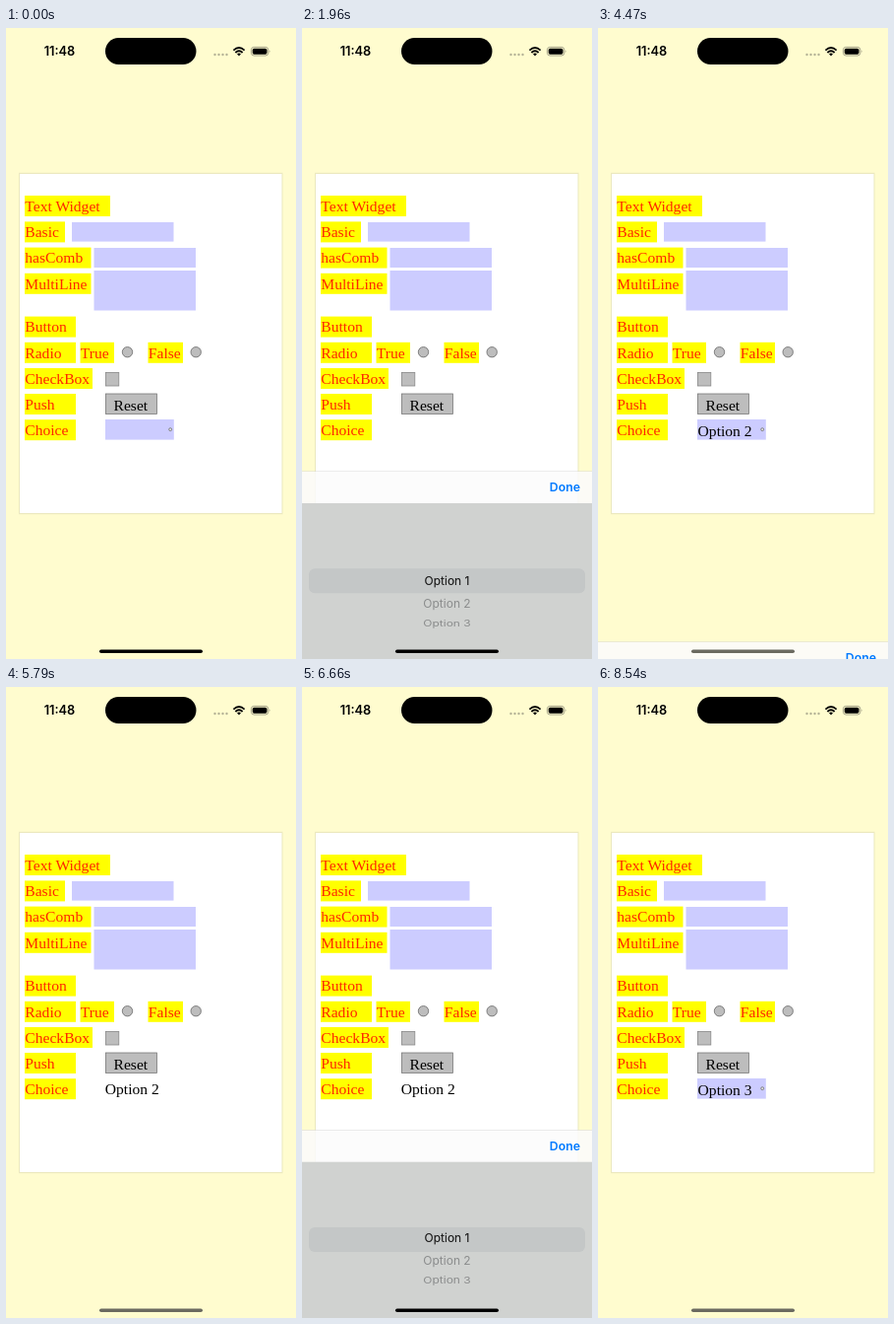
These frames come from a looping animation (295 px wide and 640 px high, 9230 ms). An HTML page:

```html
<!DOCTYPE html>
<html lang="en">
<head>
<meta charset="utf-8">
<title>Form picker</title>
<style>
  html, body { margin: 0; width: 100%; height: 100%; overflow: hidden; background: #fffccf; }
  svg { display: block; width: 295px; height: 640px; }
  .form text { font: 15.6px "Liberation Serif", "Times New Roman", serif; }
  .ui { font-family: Inter, "Liberation Sans", sans-serif; }
  .opt { font-size: 12px; text-anchor: middle; }
</style>
</head>
<body>
<svg viewBox="0 0 295 640">
  <defs>
    <clipPath id="bandClip"><rect x="7" y="548" width="281" height="25" rx="6"/></clipPath>
    <clipPath id="wheelClip"><rect x="0" y="482" width="295" height="158"/></clipPath>
  </defs>
  <rect width="295" height="640" fill="#fffccf"/>

  <g class="form">
    <rect x="13" y="146.8" width="268.5" height="346.4" fill="#000" opacity=".08"/>
    <rect x="14" y="148" width="266.5" height="344" fill="#fff"/>
    <g id="labels"></g>
    <g fill="#ccccff">
      <rect x="67" y="197" width="103.5" height="19.6"/>
      <rect x="89.5" y="223" width="103.5" height="20"/>
      <rect x="89.5" y="246" width="103.5" height="40.5"/>
    </g>
    <g fill="#bdbdbd" stroke="#666" stroke-width=".8">
      <circle cx="123.5" cy="328.7" r="5.2"/>
      <circle cx="193.2" cy="328.7" r="5.2"/>
      <rect x="101.4" y="349.4" width="13.4" height="13.6" stroke="#888"/>
      <rect x="101.4" y="371" width="52" height="20.4" stroke="#777"/>
    </g>
    <text x="109.5" y="388">Reset</text>
    <g id="field">
      <rect x="101" y="397" width="69.8" height="20.6" fill="#ccccff"/>
      <circle cx="167.2" cy="407.2" r="1.5" fill="#ddd" stroke="#666" stroke-width=".7"/>
    </g>
    <text id="choice"></text>
  </g>

  <g class="ui">
    <text x="54.5" y="28.4" font-size="12.8" font-weight="600" text-anchor="middle">11:48</text>
    <rect x="101" y="10" width="92.5" height="27" rx="13.5"/>
    <g fill="#b5b396">
      <circle cx="212.5" cy="27" r="1.2"/><circle cx="216.5" cy="27" r="1.2"/>
      <circle cx="220.5" cy="27" r="1.2"/><circle cx="224.5" cy="27" r="1.2"/>
    </g>
    <g fill="none" stroke="#000" stroke-width="1.8">
      <path d="M231.4 22.6Q237 17.4 242.6 22.6"/>
      <path d="M233.4 25Q237 21.6 240.6 25"/>
    </g>
    <path d="M237 28.4L235 26.3Q237 24.8 239 26.3Z"/>
    <rect x="249.4" y="19.4" width="17.4" height="8.6" rx="2.8" fill="none" stroke="#9b9982" stroke-width=".9"/>
    <rect x="250.7" y="20.7" width="14.8" height="6" rx="1.7"/>
    <path d="M267.8 22.2Q269.4 23.7 267.8 25.2Z" fill="#9b9982"/>

    <g id="panel">
      <rect y="449.3" width="295" height="32.7" fill="#fcfcfc" fill-opacity=".87"/>
      <rect y="449" width="295" height=".6" fill="#000" opacity=".12"/>
      <text x="283" y="470.2" font-size="12.3" font-weight="600" text-anchor="end" fill="#007aff">Done</text>
      <rect y="481.7" width="295" height="159" fill="#d0d2d0"/>
      <rect x="7" y="548" width="281" height="25" rx="6" fill="#c4c7c7"/>
      <g id="dim" clip-path="url(#wheelClip)" fill="#8a8c8c"></g>
      <g id="lit" clip-path="url(#bandClip)" fill="#1c1c1c"></g>
    </g>
    <rect id="home" x="95" y="630.4" width="105" height="3.6" rx="1.8"/>
  </g>
</svg>

<script>
const LOOP = 9230;
const $ = id => document.getElementById(id);

function add(parent, tag, attrs, text = "") {
  const el = document.createElementNS("http://www.w3.org/2000/svg", tag);
  for (const k in attrs) el.setAttribute(k, attrs[k]);
  el.textContent = text;
  return parent.appendChild(el);
}

// text, left, width, top
[
  ["Text Widget", 19, 87, 170], ["Basic", 19, 41, 196.4], ["hasComb", 19, 67.5, 222.6],
  ["MultiLine", 19, 67.5, 248.8], ["Button", 19, 52, 292.6], ["Radio", 19, 52, 318.8],
  ["True", 75.5, 34.5, 318.8], ["False", 144.5, 35.5, 318.8], ["CheckBox", 19, 69, 345],
  ["Push", 19, 52, 371], ["Choice", 19, 52, 397.2]
].forEach(([text, x, width, y]) => {
  add($("labels"), "rect", { x, y, width, height: 21, fill: "#ffff00" });
  add($("labels"), "text", { x: x + .3, y: y + 15.7, fill: "#ff2600" }, text);
});

const rows = [1, 2, 3].map(n =>
  ["dim", "lit"].map(id => add($(id), "text", { class: "opt" }, "Option " + n)));

// Bursts of movement: start, end, number of picture changes
const bursts = [
  [1290, 1960, 7], [2320, 2670, 4], [2920, 3040, 2], [3210, 3680, 5],
  [4120, 4790, 7], [5790, 6370, 6], [6660, 7540, 9], [7960, 8540, 6]
];

function sample(t) {
  let held = 0;
  for (const [start, end, n] of bursts) {
    if (t < start) break;
    const step = (end - start) / (n - 1);
    held = Math.min(end, start + Math.floor((t - start) / step + .001) * step);
  }
  return held;
}

// Critically damped spring, 0 to 1
function spring(t, start) {
  const x = Math.max(0, t - start) * .01826;
  return 1 - (1 + x) * Math.exp(-x);
}

const openness = t =>
  spring(t, 1470) - spring(t, 4237) + spring(t, 5854) - spring(t, 8050);

// Time, selected row position
const scroll = [
  [2200, 0], [2320, -.2], [2437, -.38], [2553, -.15], [2670, 0],
  [2810, 0], [2920, .15], [3040, .42], [3100, .42], [3210, .66],
  [3327, .84], [3445, .94], [3562, .985], [3680, 1],
  [5000, 1], [5001, 0], [6550, 0], [6660, .1], [6880, .6],
  [7100, 1.35], [7320, 1.85], [7540, 2], [LOOP, 2]
];

function rowAt(t) {
  const i = scroll.findIndex(k => k[0] > t);
  if (i < 1) return i ? 2 : 0;
  const [t0, a] = scroll[i - 1], [t1, b] = scroll[i];
  return a + (b - a) * (t - t0) / (t1 - t0);
}

const choices = [[0, ""], [2670, "Option 1"], [4120, "Option 2"], [7960, "Option 3"]];
const within = (t, a, b) => t >= a && t < b;

function draw(t) {
  t = sample(t);
  $("panel").setAttribute("transform", `translate(0 ${(191 * (1 - openness(t))).toFixed(2)})`);
  $("panel").style.display = openness(t) < .004 ? "none" : "";

  const pos = rowAt(t);
  rows.forEach((pair, i) => {
    const a = (i - pos) * .363;
    const y = 560.8 + 64.8 * Math.sin(a);
    for (const el of pair)
      el.setAttribute("transform", `translate(147.5 ${y.toFixed(2)}) scale(1 ${Math.cos(a).toFixed(3)}) translate(0 4.3)`);
  });

  const editing = within(t, 1290, 4120) || within(t, 5790, 7960);
  $("field").style.display = editing ? "none" : "";
  const choice = $("choice");
  choice.textContent = choices.filter(c => c[0] <= t + .5).pop()[1];
  choice.setAttribute("x", editing ? 100.8 : 101.6);
  choice.setAttribute("y", editing ? 413 : 414);

  const faded = within(t, 4300, 5850) || t >= 8150;
  $("home").setAttribute("fill", faded ? "#6b6a60" : "#000");
}

const begin = performance.now();
function tick() {
  draw((performance.now() - begin) % LOOP);
  requestAnimationFrame(tick);
}
tick();
</script>
</body>
</html>
```
